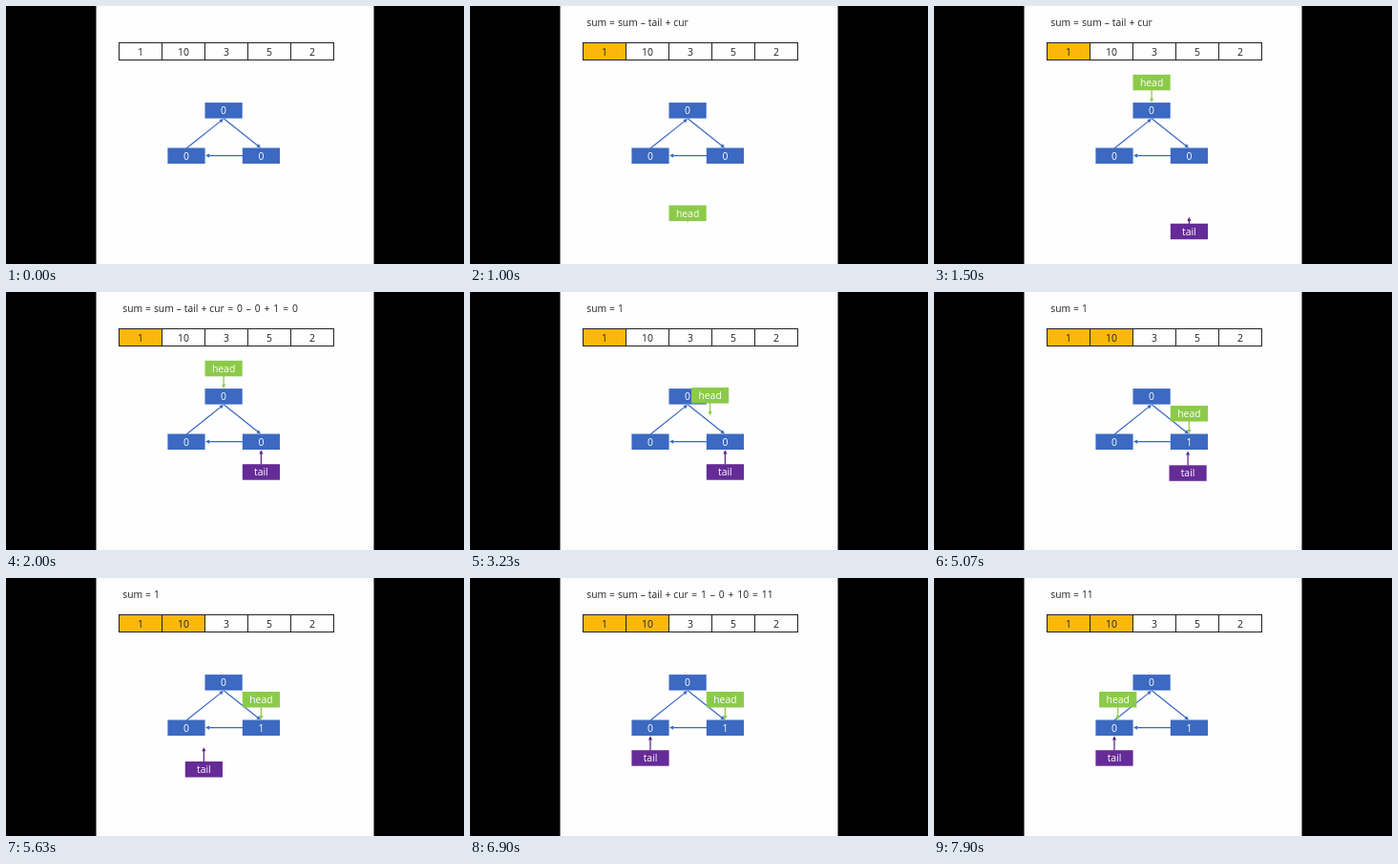
These frames come from a looping animation (480 by 270 pixels, 8 s). An HTML page:

```html
<!DOCTYPE html>
<html lang="en">
<head>
<meta charset="utf-8">
<style>
  html, body { margin: 0; width: 100%; height: 100%; overflow: hidden; background: #000; }
  svg { display: block; width: 100vw; height: 100vh; }
  text { font: 10.4px "Open Sans", "Noto Sans", sans-serif; fill: #222; }
  .mid { text-anchor: middle; }
  .light { fill: #fff; }
  #formula { font-size: 10.3px; word-spacing: .3px; }
  #values { font-size: 10.3px; word-spacing: 1.2px; }
</style>
</head>
<body>
<svg id="stage" viewBox="0 0 480 270">
  <rect width="480" height="270" fill="#000"/>
  <rect x="94.5" width="291" height="270" fill="#fefefe"/>
  <text id="formula" x="122.3" y="21"></text>
  <text id="values" x="232.3" y="21"></text>
</svg>
<script>
const LOOP = 8000;
const BLUE = '#3c69c1', GREEN = '#8cca49', PURPLE = '#652b97', ORANGE = '#fbb80b';
const stage = document.getElementById('stage');
const formula = document.getElementById('formula');
const values = document.getElementById('values');

function add(tag, attrs, parent = stage) {
  const el = document.createElementNS('http://www.w3.org/2000/svg', tag);
  for (const key in attrs) el.setAttribute(key, attrs[key]);
  return parent.appendChild(el);
}

function label(x, y, str, cls, parent) {
  const el = add('text', { x, y: y + 4, class: 'mid ' + cls }, parent);
  el.textContent = str;
  return el;
}

function arrow(x1, y1, x2, y2, color, parent) {
  const g = add('g', {}, parent);
  const len = Math.hypot(x2 - x1, y2 - y1);
  const angle = Math.atan2(y2 - y1, x2 - x1) * 180 / Math.PI;
  g.setAttribute('transform', `translate(${x1} ${y1}) rotate(${angle})`);
  add('path', { d: `M0 0H${len - 3}`, stroke: color, 'stroke-width': 1.25 }, g);
  add('path', { d: `M${len} 0l-4.2 -2.1v4.2z`, fill: color }, g);
}

function box(x, y, str, color, parent) {
  add('rect', { x: x - 19.6, y: y - 8.2, width: 39.2, height: 16.5, fill: color }, parent);
  return label(x, y, str, 'light', parent);
}

// Array cells, the first two with a highlight
const marks = [1, 10, 3, 5, 2].map((n, i) => {
  const at = { x: 118.5 + i * 45, y: 38.5, width: 45, height: 18 };
  const mark = i < 2 ? add('rect', { ...at, fill: ORANGE }) : null;
  add('rect', { ...at, fill: 'none', stroke: '#222' });
  label(141 + i * 45, 47.8, n, '');
  return mark;
});

// Ring of three nodes
box(228.1, 109.3, '0', BLUE);
const rightValue = box(267.4, 156.7, '0', BLUE);
box(189, 156.7, '0', BLUE);
arrow(189, 149, 228, 118, BLUE);
arrow(228.5, 118, 267, 148.5, BLUE);
arrow(248, 156.6, 209, 156.6, BLUE);

function pointer(x, y, str, color, from, to, lineColor) {
  const root = add('g', {});
  const line = add('g', {}, root);
  const body = add('g', {}, root);
  arrow(x, from, x, to, lineColor, line);
  box(x, y, str, color, body);
  return { root, line, body };
}
const head = pointer(228.1, 80, 'head', GREEN, 88, 101, GREEN);
const tail = pointer(267.4, 188.4, 'tail', PURPLE, 180.5, 165.3, '#592584');

const ramp = (t, a, b) => Math.min(1, Math.max(0, (t - a) / (b - a)));
const smooth = (t, a, b) => { const p = ramp(t, a, b); return p * p * (3 - 2 * p); };
const shift = (el, x, y) => el.setAttribute('transform', `translate(${x} ${y})`);

// Label and arrow each start just below the stage
function flyIn(p, q, bodyTravel, lineTravel) {
  p.root.setAttribute('visibility', q > 0 ? 'visible' : 'hidden');
  shift(p.body, 0, bodyTravel * (1 - q));
  shift(p.line, 0, lineTravel * (1 - q));
}

// [start, left part, right part]
const SUM = 'sum = sum – tail + cur';
const captions = [
  [0, '', ''],
  [420, SUM, ''],
  [1820, SUM, '= 0 – 0 + 1 = 0'],
  [2650, 'sum = 1', ''],
  [6100, SUM, ''],
  [6550, SUM, '= 1 – 0 + 10 = 11'],
  [7020, 'sum = 11', '']
];

function draw(t) {
  const [start, left, right] = captions.filter(c => c[0] <= t).pop();
  formula.textContent = left;
  values.textContent = right;
  formula.setAttribute('opacity', start === 420 ? ramp(t, 420, 700) : 1);

  marks[0].setAttribute('opacity', ramp(t, 50, 350));
  marks[1].setAttribute('opacity', ramp(t, 4300, 4600));
  rightValue.textContent = t < 3700 ? '0' : '1';

  flyIn(head, ramp(t, 868, 1298), 198, 182);
  flyIn(tail, ramp(t, 1298, 1728), 90, 105);

  const h1 = smooth(t, 2750, 3600), h2 = smooth(t, 7120, 8020);
  shift(head.root, 39.3 * h1 - 78.4 * h2, 47.2 * h1);

  const q = smooth(t, 5000, 5920);
  shift(tail.root, -78.4 * q, 66 * q * (1 - q));
}

const origin = performance.now();
function tick() {
  draw((performance.now() - origin) % LOOP);
  requestAnimationFrame(tick);
}
tick();
</script>
</body>
</html>
```
